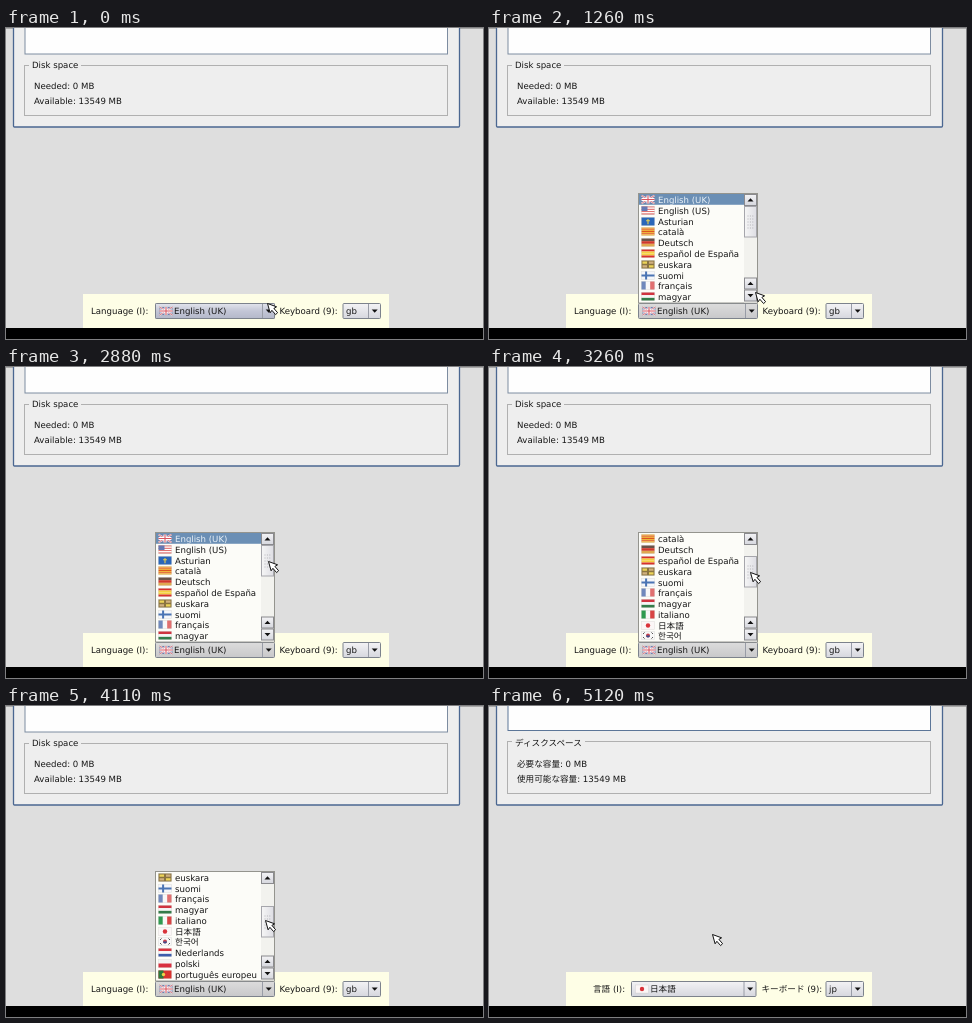
Write an HTML page that moves like this. It is 477 px wide and 311 px high and loops after 5420 ms.

```html
<!DOCTYPE html>
<html lang="ja">
<head>
<meta charset="utf-8">
<title>Language picker</title>
<style>
  html, body { margin: 0; width: 100%; height: 100%; overflow: hidden; background: #dedede; }
  svg { display: block; }
  text {
    font: 8.6px "DejaVu Sans", "Noto Sans CJK JP", "Noto Sans CJK KR", "Noto Sans CJK", sans-serif;
    fill: #161616; text-rendering: geometricPrecision; white-space: pre;
  }
  .hot text { fill: #e9f1f8; }
</style>
</head>
<body>
<svg id="stage" width="477" height="311" viewBox="0 0 477 311">
  <defs>
    <linearGradient id="face" x2="0" y2="1">
      <stop offset="0" stop-color="#dcdcdc"/><stop offset="1" stop-color="#c8c8ca"/>
    </linearGradient>
    <linearGradient id="lit" x2="0" y2="1">
      <stop offset="0" stop-color="#e2e4ec"/><stop offset=".5" stop-color="#c3c6d6"/>
      <stop offset="1" stop-color="#b4b8ca"/>
    </linearGradient>
    <linearGradient id="pale" x2="0" y2="1">
      <stop offset="0" stop-color="#f3f3f5"/><stop offset="1" stop-color="#d6d7de"/>
    </linearGradient>
    <linearGradient id="grip">
      <stop offset="0" stop-color="#f6f6f6"/><stop offset="1" stop-color="#dedee4"/>
    </linearGradient>
    <clipPath id="view"><rect x="150" y="166" width="105" height="108.4"/></clipPath>
  </defs>
</svg>
<script>
const LOOP = 5420, ROW = 10.78;
const stage = document.getElementById('stage');

function add(parent, tag, attrs = {}, content) {
  const el = document.createElementNS('http://www.w3.org/2000/svg', tag);
  for (const key in attrs) el.setAttribute(key, attrs[key]);
  if (content !== undefined) el.textContent = content;
  return parent.appendChild(el);
}
const group = (parent, attrs) => add(parent, 'g', attrs);
const box = (parent, x, y, width, height, fill, extra) =>
  add(parent, 'rect', { x, y, width, height, fill, ...extra });
const label = (parent, x, y, words) => add(parent, 'text', { x, y }, words);
const path = (parent, d, fill, extra) => add(parent, 'path', { d, fill, ...extra });
const move = (x, y) => `translate(${x}px, ${y}px)`;

// Steps are [time, value] pairs, held until the next one.
function play(el, prop, steps) {
  const frames = steps.map(([time, value]) =>
    ({ offset: time / LOOP, [prop]: value, easing: 'step-end' }));
  frames.push({ offset: 1, [prop]: steps[steps.length - 1][1] });
  el.animate(frames, { duration: LOOP, iterations: Infinity });
}

function show(el, from, to) {
  const steps = [[0, from === 0 ? 1 : 0]];
  if (from > 0) steps.push([from, 1]);
  if (to < LOOP) steps.push([to, 0]);
  play(el, 'opacity', steps);
  return el;
}

// Flags, 13 by 8
const bands = (...colors) => g => colors.forEach((c, i) =>
  box(g, 0, i * 8 / colors.length, 13, 8 / colors.length, c));
const pales = (...colors) => g => colors.forEach((c, i) =>
  box(g, i * 13 / colors.length, 0, 13 / colors.length, 8, c));
const cross = (ground, color, x, width) => g => {
  box(g, 0, 0, 13, 8, ground);
  box(g, x, 0, width, 8, color);
  box(g, 0, 4 - width / 2, 13, width, color);
};
const disc = (ground, color, r) => g => {
  box(g, 0, 0, 13, 8, ground);
  add(g, 'circle', { cx: 6.5, cy: 4, r, fill: color });
};
const over = (...parts) => g => parts.forEach(part => part(g));

const uk = over(
  g => box(g, 0, 0, 13, 8, '#7480b0'),
  g => path(g, 'M0 0L13 8M13 0L0 8', 'none', { stroke: '#f4eef0', 'stroke-width': 2 }),
  g => path(g, 'M0 0L13 8M13 0L0 8', 'none', { stroke: '#d8606a', 'stroke-width': .8 }),
  g => path(g, 'M6.5 0V8M0 4H13', 'none', { stroke: '#fff', 'stroke-width': 3 }),
  g => path(g, 'M6.5 0V8M0 4H13', 'none', { stroke: '#d85560', 'stroke-width': 1.1 }));
const us = over(
  bands('#dd6a6a', '#fff', '#dd6a6a', '#fff', '#dd6a6a', '#fff', '#dd6a6a'),
  g => box(g, 0, 0, 6, 4.5, '#6478b4'));
const asturias = over(
  g => box(g, 0, 0, 13, 8, '#2a66b8'),
  g => path(g, 'M6.5 1.5V6.8M4.6 3.3H8.4', 'none', { stroke: '#e8cf50', 'stroke-width': 1.1 }));
const basque = over(
  g => box(g, 0, 0, 13, 8, '#8a7440'),
  g => path(g, 'M1 1H5.5V3.3H1ZM7.5 4.8H12V7H7.5Z', '#ecd458'),
  g => path(g, 'M7.5 1H12V3.3H7.5ZM1 4.8H5.5V7H1Z', '#d0b080'));
const korea = over(
  disc('#f8f8f8', '#c8404c', 2),
  g => path(g, 'M4.5 4A2 2 0 0 0 8.5 4Z', '#3a4f90'),
  g => path(g, 'M1.6 2.4L3 1M10 1L11.4 2.4M1.6 5.6L3 7M10 7L11.4 5.6', 'none', { stroke: '#444', 'stroke-width': 1 }));
const japan = disc('#fbf6f6', '#d9333a', 2.2);
const portugal = over(
  g => box(g, 0, 0, 13, 8, '#d8322e'),
  g => box(g, 0, 0, 5, 8, '#2c7a3c'),
  g => add(g, 'circle', { cx: 5, cy: 4, r: 1.7, fill: '#ecd24a' }));

const rows = [
  ['English (UK)', uk],
  ['English (US)', us],
  ['Asturian', asturias],
  ['català', bands('#eeb030', '#dc5420', '#eeb030', '#dc5420', '#eeb030', '#dc5420', '#eeb030')],
  ['Deutsch', bands('#6a5248', '#d0382c', '#e0a850')],
  ['español de España', bands('#d8322c', '#f4d040', '#f4d040', '#d8322c')],
  ['euskara', basque],
  ['suomi', cross('#f4f6fa', '#4a74b4', 3.6, 2)],
  ['français', pales('#7088bc', '#f8f8f8', '#e07070')],
  ['magyar', bands('#d03440', '#f6f6f6', '#347c4a')],
  ['italiano', pales('#2f9a50', '#f8f8f8', '#d84444')],
  ['日本語', japan],
  ['한국어', korea],
  ['Nederlands', bands('#d83440', '#f8f8f8', '#3c5cac')],
  ['polski', bands('#f4f4f4', '#d83040')],
  ['português europeu', portugal],
];

function flag(parent, x, y, draw) {
  const g = group(parent, { transform: `translate(${x} ${y})` });
  draw(g);
  box(g, 0, 0, 13, 8, 'none', { stroke: '#555', 'stroke-opacity': .15, 'stroke-width': .6 });
}

function arrow(parent, x, y, dir) {
  path(parent, `M${x - 3} ${y - 1.6 * dir}H${x + 3}L${x} ${y + 1.8 * dir}Z`, '#111');
}

function combo(parent, x, width, face, words, draw) {
  const split = x + width - 12.5;
  box(parent, x + .5, 275.5, width - 1, 15, `url(#${face})`, { stroke: '#7c828c', rx: 1 });
  path(parent, `M${split} 276V290`, 'none', { stroke: '#989ca6' });
  arrow(parent, split + 6.2, 283, 1);
  if (draw) flag(parent, x + 4.5, 279, draw);
  label(parent, x + (draw ? 19 : 3.5), 286.2, words);
}

// Installer window
box(stage, 0, 0, 477, 1, '#a8a8a8');
box(stage, 7.5, -5, 446, 104, '#eeeeee', { stroke: '#4b6791', 'stroke-width': 1.3, rx: 1 });
box(stage, 77, 266, 306, 34, '#fefee6');
box(stage, 0, 300, 477, 11, '#000');

function panes(parent, listEnd, edge, frameTop) {
  box(parent, 19, -5, 422.5, listEnd + 5, '#fefefe', { stroke: edge });
  box(parent, 18.5, frameTop, 423, 87.5 - frameTop, 'none', { stroke: '#b0b0b0' });
}

function captions(parent, gap, title, needed, free, language, languageX, keyboard, keyboardX) {
  box(parent, 23, 34, gap, 7, '#eeeeee');
  label(parent, 26, 40, title);
  label(parent, 28, 60.6, needed + ': 0 MB');
  label(parent, 28, 76, free + ': 13549 MB');
  label(parent, languageX, 286.2, language + ' (I):');
  label(parent, keyboardX, 286.2, keyboard + ' (9):');
}

const english = show(group(stage), 0, 5120);
panes(english, 26, '#7d8ca0', 37.5);
captions(english, 52, 'Disk space', 'Needed', 'Available', 'Language', 85, 'Keyboard', 273.5);
combo(english, 149, 120, 'face', 'English (UK)', uk);
combo(english, 336.5, 38.5, 'pale', 'gb');
combo(show(group(stage), 0, 300), 149, 120, 'lit', 'English (UK)', uk);

const japanese = show(group(stage), 5120, LOOP);
panes(japanese, 24.5, '#5c7698', 35.5);
captions(japanese, 73, 'ディスクスペース', '必要な容量', '使用可能な容量', '言語', 104, 'キーボード', 272.5);
combo(japanese, 142, 125.5, 'pale', '日本語', japan);
combo(japanese, 336.5, 38.5, 'pale', 'jp');

// Drop-down list
const popup = show(group(stage), 300, 5010);
box(popup, 149.5, 165.5, 119, 109.5, '#fcfcf8', { stroke: '#94948e' });
const list = group(group(popup, { 'clip-path': 'url(#view)' }));
const hot = { 0: [0, 4300], 10: [4300, 4500], 11: [4500, LOOP] };

rows.forEach(([name, draw], i) => {
  const y = Math.round(166.1 + i * ROW);
  label(list, 169, y + 8.8, name);
  if (hot[i]) {
    const g = show(group(list, { class: 'hot' }), ...hot[i]);
    box(g, 150, y, 106, ROW, '#6b8fb5');
    label(g, 169, y + 8.8, name);
  }
  flag(list, 152.5, y + 1.5, draw);
});

// Scroll bar
const button = (y, dir) => {
  box(popup, 255.5, y + .5, 12, 11, 'url(#pale)', { stroke: '#8a8a8e' });
  arrow(popup, 261.5, y + 6, dir);
};
box(popup, 255, 166, 13, 108.5, '#f2f2ee');
const thumb = group(popup);
box(thumb, 255.5, 178.5, 12, 30.5, 'url(#grip)', { stroke: '#a6a6ac' });
for (let y = 188; y < 201; y += 3)
  path(thumb, `M258.5 ${y}H264.5`, 'none', { stroke: '#b0b0b6', 'stroke-dasharray': '1 1.4' });
button(166, -1);
button(249.5, -1);
button(261.5, 1);

const scroll = [[0, 0], [3070, 1], [3160, 2], [3260, 3], [3380, 4], [3490, 4.4], [3690, 5], [3800, 6]];
play(list, 'transform', scroll.map(([t, n]) => [t, move(0, -Math.round(Math.floor(n) * ROW))]));
play(thumb, 'transform', scroll.map(([t, n]) => [t, move(0, Math.round(n * 11 / 3))]));

// Pointer
const pointer = group(stage);
path(pointer, 'M.5 .5L9.6 3.8L6.9 5.4L10.6 9.7L8.6 11.6L4.9 7.3L3.1 9.8Z', '#fff',
  { stroke: '#111', 'stroke-linejoin': 'round' });
play(pointer, 'transform', [
  [0, 261, 275], [110, 262, 275], [650, 264, 276], [750, 267, 277], [850, 270, 278], [950, 272, 279],
  [1260, 266, 264], [1330, 265, 250], [1440, 264, 225], [1550, 264, 200], [1670, 264, 187],
  [2270, 264, 190], [2470, 262, 193], [2880, 262, 194],
  [3070, 262, 197], [3160, 261, 201], [3260, 261, 205], [3380, 260, 208], [3490, 260, 209],
  [3690, 260, 211], [3800, 260, 213], [3990, 259, 214],
  [4300, 252, 216], [4400, 244, 219], [4500, 235, 223], [4600, 227, 227], [4700, 222, 229],
  [5120, 223, 228],
].map(([t, x, y]) => [t, move(x, y)]));
</script>
</body>
</html>
```
